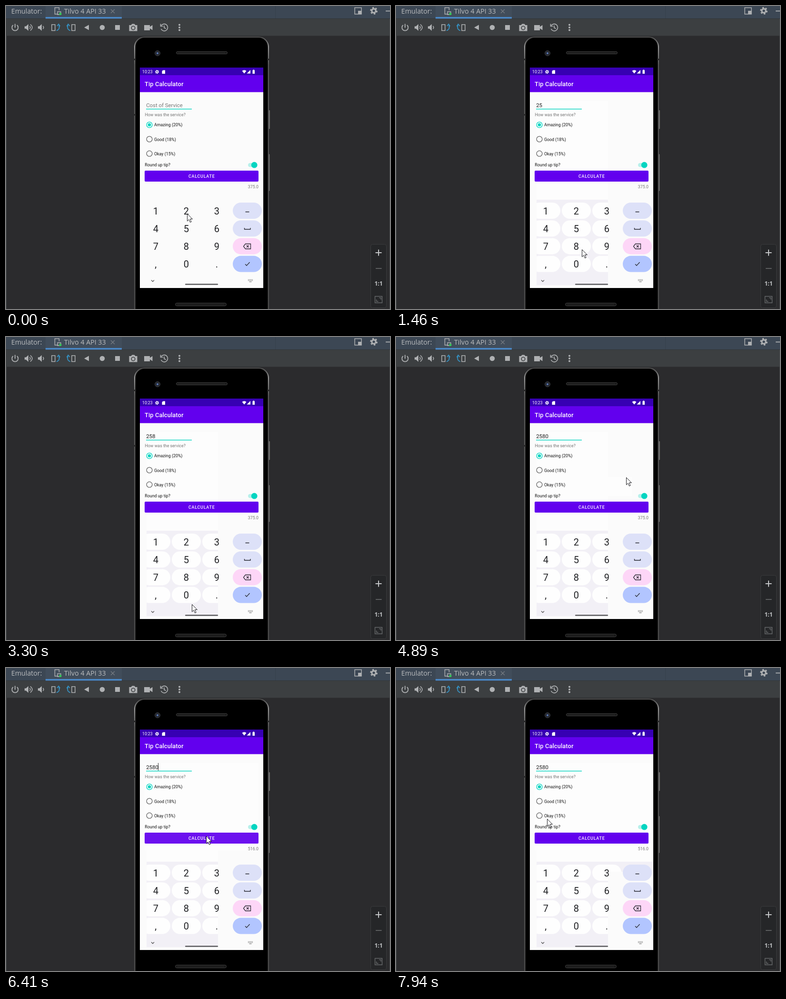
An HTML page that plays this animation: 806x635 px, repeating every 8 s.

```html
<!DOCTYPE html>
<html lang="en">
<head>
<meta charset="utf-8">
<title>Tip Calculator in the emulator</title>
<style>
  html, body { margin: 0; width: 100%; height: 100%; overflow: hidden; background: #2b2b2d; }
  svg { display: block; width: 806px; height: 635px; font-family: Roboto, sans-serif; }
  .ide { font: 14.2px "Open Sans", sans-serif; fill: #bbbdbf; }
  .icon { fill: none; stroke: #afb1b3; stroke-width: 1.8; }
  .solid { fill: #afb1b3; stroke: none; }
  .blue { stroke: #3592c4; }
  .body { font-size: 8.85px; fill: #111; }
  .grey { fill: #757575; }
  .field { font-size: 11.4px; }
  .digit { font-size: 20px; fill: #202124; text-anchor: middle; }
  .glyph { fill: none; stroke: #2a2b33; stroke-width: 1.3; }
</style>
</head>
<body>
<svg viewBox="0 0 806 635">
  <defs>
    <g id="gear" fill="none">
      <circle r="4.2" stroke-width="3.2"/>
      <circle r="6.6" stroke-width="2.6" stroke-dasharray="3.45 3.46"/>
    </g>
    <linearGradient id="metal" x2="0" y2="1">
      <stop stop-color="#4a4a4a"/><stop offset=".03" stop-color="#a0a0a0"/>
      <stop offset=".09" stop-color="#5c5c5c"/><stop offset="1" stop-color="#4c4c4c"/>
    </linearGradient>
    <radialGradient id="wave" gradientUnits="userSpaceOnUse" cx="420" cy="357" r="100">
      <stop offset=".25" stop-color="#fff"/><stop offset="1" stop-color="#fff" stop-opacity="0"/>
    </radialGradient>
    <filter id="blur" x="-10%" y="-50%" width="120%" height="200%"><feGaussianBlur stdDeviation="2"/></filter>
    <clipPath id="fresh"></clipPath>
  </defs>

  <!-- IDE window -->
  <rect width="806" height="635" fill="#2b2b2d"/>
  <rect width="806" height="27" fill="#3c4754"/>
  <rect x="83" width="160" height="27" fill="#414d5b"/>
  <rect y="26" width="806" height="1" fill="#323539"/>
  <rect x="565" width="1" height="26" fill="#35404c"/>
  <rect y="27" width="806" height="36" fill="#3c3f41"/>
  <rect y="62" width="806" height="1" fill="#323436"/>
  <rect y="27" width="2" height="608" fill="#3c3f41"/>
  <rect x="2" y="63" width="1" height="572" fill="#242527"/>
  <rect x="805" y="27" width="1" height="608" fill="#4a4c4e"/>
  <rect x="83" y="23" width="160" height="3.5" fill="#4a88c7"/>
  <text class="ide" x="11" y="16">Emulator:</text>
  <text class="ide" x="122" y="16" font-size="14.4">Tilvo 4 API 33</text>
  <g class="icon">
    <path d="M110 17H102.500V3.500H111.500V9M108 12h7v6h-7z" stroke-width="1.4"/>
    <circle cx="114" cy="16.500" r="2.600" fill="#35c759" stroke="none"/>
    <path d="M220 7l8 8M228 7l-8 8" stroke="#777d84" stroke-width="1.2"/>
    <path d="M732 3.500h14v13.500h-14z" stroke-width="1.5"/>
    <path class="solid" d="M739 10h7v7h-7z"/>
    <use href="#gear" x="772" y="10"/>
    <path d="M797 10.500h9"/>
    <path d="M15 40a6.500 6.500 0 1 0 8 0M19 37.500v8"/>
    <path class="solid" d="M39 42.500h3l5-4.500v14l-5-4.500h-3zM67 42.500h3l5-4.500v14l-5-4.500h-3z"/>
    <path d="M49.500 42q3 3 0 6M51 38.500q8 6.500 0 13M77.500 42q3 3 0 6" stroke-width="1.6"/>
    <path d="M96 39h7v12.500h-7zM138 39h7v12.500h-7z" stroke-width="1.5"/>
    <path class="blue" d="M106 51.500q8-2 5-12M107 42l3.500-4 3 4.500M135 51.500q-8-2-5-12M134 42l-3.500-4-3 4.500"/>
    <path class="solid" d="M164 45l10-5.500v11zM229 40h10v10h-10zM290 40h12v3.500l5.500-3.500v10.500l-5.500-3.500v4h-12z"/>
    <circle class="solid" cx="202" cy="45" r="5.300"/>
    <path class="solid" d="M258.500 40h4l2-2.500h5l2 2.500h4v12.500h-17z"/>
    <circle cx="267" cy="46" r="3.800" stroke="#3c3f41" stroke-width="1.6"/>
    <path d="M326 41a7.300 7.300 0 1 1-.500 7M324.500 37.500v5h5M332 41v4.500l3.500 2" stroke-width="1.7"/>
    <g class="solid"><circle cx="364" cy="39.500" r="2"/><circle cx="364" cy="45" r="2"/><circle cx="364" cy="50.500" r="2"/></g>
    <rect x="765.5" y="499.500" width="33" height="133" rx="4" fill="#252628" stroke="#3a3b3d" stroke-width="1"/>
    <path d="M775.500 517h13M782 510.500v13" stroke="#c4c6c8" stroke-width="2"/>
    <path d="M776 550h12.500" stroke="#66686a" stroke-width="1.7"/>
    <path d="M774.500 608.500h15v13.500h-15zM777.500 615v4h4M783 611.500h4v4" stroke="#66686a" stroke-width="1.4"/>
  </g>
  <text x="782" y="586" font-family="Open Sans, sans-serif" font-size="12" font-weight="700" fill="#c0c2c4" text-anchor="middle">1:1</text>

  <!-- Phone shell -->
  <path d="M551 218h3.500v40h-3.500zM551 310h3v78h-3z" fill="#707070" stroke="#1c1c1c" stroke-width=".7"/>
  <rect x="270" y="65" width="281" height="650" rx="21" fill="#171717" stroke="url(#metal)" stroke-width="2"/>
  <rect x="273" y="67" width="275.500" height="650" rx="18"/>
  <path d="M269 112h4M548 112h4M269 228h4" stroke="#222" stroke-width="3"/>
  <circle cx="318" cy="99" r="5.500" fill="#24272e" stroke="#3a3d42"/>
  <circle cx="318" cy="99" r="2" fill="#5a78b4"/>
  <g fill="#161616" stroke="#414141"><rect x="357.500" y="95.500" width="107" height="5" rx="2.500"/><rect x="355.500" y="622.500" width="107" height="6" rx="3"/></g>
  <path d="M362 98h98M360 625.500h98" stroke="#343434" stroke-dasharray="2 1"/>

  <!-- App screen -->
  <rect x="281" y="129" width="259" height="462" fill="#fbfbfb"/>
  <g clip-path="url(#fresh)">
    <rect x="281" y="180" width="259" height="226" fill="#fdfdfd"/>
    <rect x="281" y="406" width="259" height="185" fill="#f2f0f6"/>
    <g id="pads" fill="#fefefe"></g>
  </g>
  <rect id="press" width="61" height="34" rx="17" fill="#e2e1e7"/>
  <rect x="281" y="129" width="259" height="16" fill="#3700b3"/>
  <rect x="281" y="145" width="259" height="35.500" fill="#6200ee"/>
  <g fill="#fff">
    <text x="286" y="141" font-size="8.700">10:23</text>
    <use href="#gear" stroke="#fff" transform="translate(317 138) scale(.5)"/>
    <path d="M329.500 134.500h4.500v7.500h-6.500v-5.500zM495.500 136q4.500-3.500 9 0l-4.500 5.500zM513 134v7.500h-7.500zM517.500 134.500h1v-1h2.500v1h1v7.500h-4.500z"/>
    <text x="291" y="167.500" font-size="12.800" font-weight="500" letter-spacing=".12">Tip Calculator</text>
  </g>
  <text id="value" class="field" x="294.200" y="211.500"></text>
  <rect id="caret" y="199" width="1" height="16" fill="#333"/>
  <rect x="294" y="215.300" width="96" height="1.400" fill="#03d5c1"/>
  <g class="body">
    <text class="grey" x="291.500" y="231">How was the service?</text>
    <text x="311" y="252.300">Amazing (20%)</text>
    <text x="311" y="282.500">Good (18%)</text>
    <text x="311" y="312.600">Okay (15%)</text>
    <text x="291.300" y="336.300">Round up tip?</text>
    <text id="total" class="grey" x="530" y="381.500" text-anchor="end"></text>
  </g>
  <g fill="none" stroke="#666" stroke-width="1.300">
    <circle cx="301" cy="249" r="5.900" stroke="#03d5c1"/>
    <circle cx="301" cy="279" r="5.900"/>
    <circle cx="301" cy="309.300" r="5.900"/>
  </g>
  <circle cx="301" cy="249" r="3.300" fill="#03d5c1"/>
  <rect x="508" y="329" width="19" height="8.500" rx="4.250" fill="#b8f0ea"/>
  <circle cx="521.200" cy="333.200" r="6.400" fill="#03d5c1"/>
  <rect id="shadow" x="292" y="350" width="237" height="22" rx="2" fill="#000" filter="url(#blur)"/>
  <rect x="291" y="345" width="239" height="23" rx="2" fill="#6200ee"/>
  <rect id="ripple" x="291" y="345" width="239" height="23" rx="2" fill="url(#wave)"/>
  <text x="383" y="360" font-size="8.850" font-weight="500" letter-spacing=".79" fill="#fff">CALCULATE</text>

  <!-- Keyboard -->
  <g id="keys"></g>
  <g class="glyph">
    <path d="M502.500 431.500h8M500.500 465v3h12.500v-3M502.500 498.500h11v10.500h-11l-4-5.250zM505 501.500l4.500 4.500M509.500 501.500l-4.500 4.500M502 541l3 3 6.500-7"/>
    <path d="M305 574.500l3 3 3-3" stroke="#555"/>
    <path d="M508 573.500h10M508 575.500h10" stroke="#888" stroke-dasharray="1 .8"/>
    <path d="M510.500 578h5" stroke="#888"/>
  </g>
  <rect x="376" y="582" width="69" height="2.600" rx="1.300" fill="#5e5e60"/>
  <path id="mouse" d="M.5.500V15.800L4 12.500 6.500 18.300 9 17.300 6.500 11.500H11.300Z" fill="#fff" stroke="#1b1b1f"/>
</svg>
<script>
const LOOP = 8000;
const $ = id => document.getElementById(id);

// The screen refreshes only at these moments.
const ticks = [0, 140, 270, 400, 520, 810, 1060, 1320, 1460, 2040,
  2440, 2570, 2710, 2850, 3000, 3150, 3300, 3570, 3690, 3970, 4250,
  4650, 4770, 4890, 5030, 5180, 5320, 5470, 5720, 5870, 6020, 6210, 6410, 6560, 6710,
  6830, 6970, 7110, 7250, 7380, 7520, 7660, 7790, 7940];

// Pointer way points: time, x, y
const path = [[0, 380, 435], [270, 380, 435], [520, 390, 465], [1060, 390, 465],
  [1460, 390, 510], [2710, 390, 510], [3300, 390, 560], [3570, 390, 560], [3690, 390, 554],
  [4500, 390, 554], [4890, 483, 294], [5030, 491, 300], [5470, 420, 352], [6410, 420, 352],
  [6710, 430, 383], [7250, 530, 408], [7790, 485, 375], [7940, 317, 316], [LOOP, 317, 316]];

// Key presses: down, up, key row
const presses = [[140, 270, 0], [810, 1060, 1], [2440, 2710, 2], [3970, 4250, 3]];
const blinks = [[270, 810], [1060, 1460], [2040, 2440], [2710, 3150], [3570, 4650],
  [5180, 5720], [6210, 6710], [7250, 7660]];

// Screen areas repainted in brighter tones: time, x, y, width, height
const areas = [[140, 295, 199, 150, 386], [4890, 445, 293, 50, 40], [5720, 291, 199, 239, 177],
  [6210, 291, 199, 239, 183], [7250, 295, 199, 245, 228]];

const within = (t, [from, to]) => t >= from && t < to;
const keyX = col => 284 + col * 64;
const keyY = row => 412 + row * 37.2;

function add(parent, name, attrs, text = '') {
  const el = document.createElementNS('http://www.w3.org/2000/svg', name);
  for (const key in attrs) el.setAttribute(key, attrs[key]);
  el.textContent = text;
  return $(parent).appendChild(el);
}

const pad = (parent, col, row, extra) =>
  add(parent, 'rect', { x: keyX(col), y: keyY(row), width: 61, height: 34, rx: 17, ...extra });

['123', '456', '789', ',0.'].forEach((line, row) => {
  [...line].forEach((char, col) => {
    pad('pads', col, row);
    add('keys', 'text', { class: 'digit', x: keyX(col) + 30.3, y: keyY(row) + 24.7 }, char);
  });
  pad('keys', 3, row, { fill: ['#dde1f8', '#dde1f8', '#fdd6f7', '#b2c5ff'][row] });
});

const patches = areas.map(([, x, y, width, height]) => add('fresh', 'rect', { x, y, width, height }));

function pointer(t) {
  const i = path.findIndex(p => p[0] > t);
  const [t0, x0, y0] = path[i - 1], [t1, x1, y1] = path[i];
  const k = (t - t0) / (t1 - t0);
  return [x0 + (x1 - x0) * k, y0 + (y1 - y0) * k];
}

function draw(now) {
  const t = ticks.findLast(tick => tick <= now % LOOP);

  const typed = presses.filter(p => t >= p[1]).length;
  $('value').textContent = typed ? '2580'.slice(0, typed) : 'Cost of Service';
  $('value').setAttribute('fill', typed ? '#1c1c1c' : '#757575');
  $('total').textContent = t < 6210 ? '375.0' : '516.0';
  $('caret').setAttribute('x', [294, 301, 307, 313, 319][typed]);
  $('caret').setAttribute('opacity', +blinks.some(b => within(t, b)));

  const down = presses.find(p => within(t, p));
  $('press').setAttribute('opacity', down ? 1 : 0);
  if (down) {
    $('press').setAttribute('x', keyX(1));
    $('press').setAttribute('y', keyY(down[2]));
  }

  const age = t - 5720;
  const glow = age < 0 ? 0 : .25 * Math.max(0, Math.min(1, (840 - age) / 600));
  $('wave').setAttribute('r', age < 300 ? Math.max(1, 50 + age * .4) : 2000);
  $('ripple').setAttribute('opacity', glow);
  $('shadow').setAttribute('opacity', within(t, [5720, 6410]) ? .3 : 0);

  patches.forEach((el, i) => el.setAttribute('display', t >= areas[i][0] ? 'inline' : 'none'));
  $('mouse').setAttribute('transform', `translate(${pointer(t).map(Math.round)})`);
}

const start = performance.now();
function loop() {
  draw(performance.now() - start);
  requestAnimationFrame(loop);
}
loop();
</script>
</body>
</html>
```
